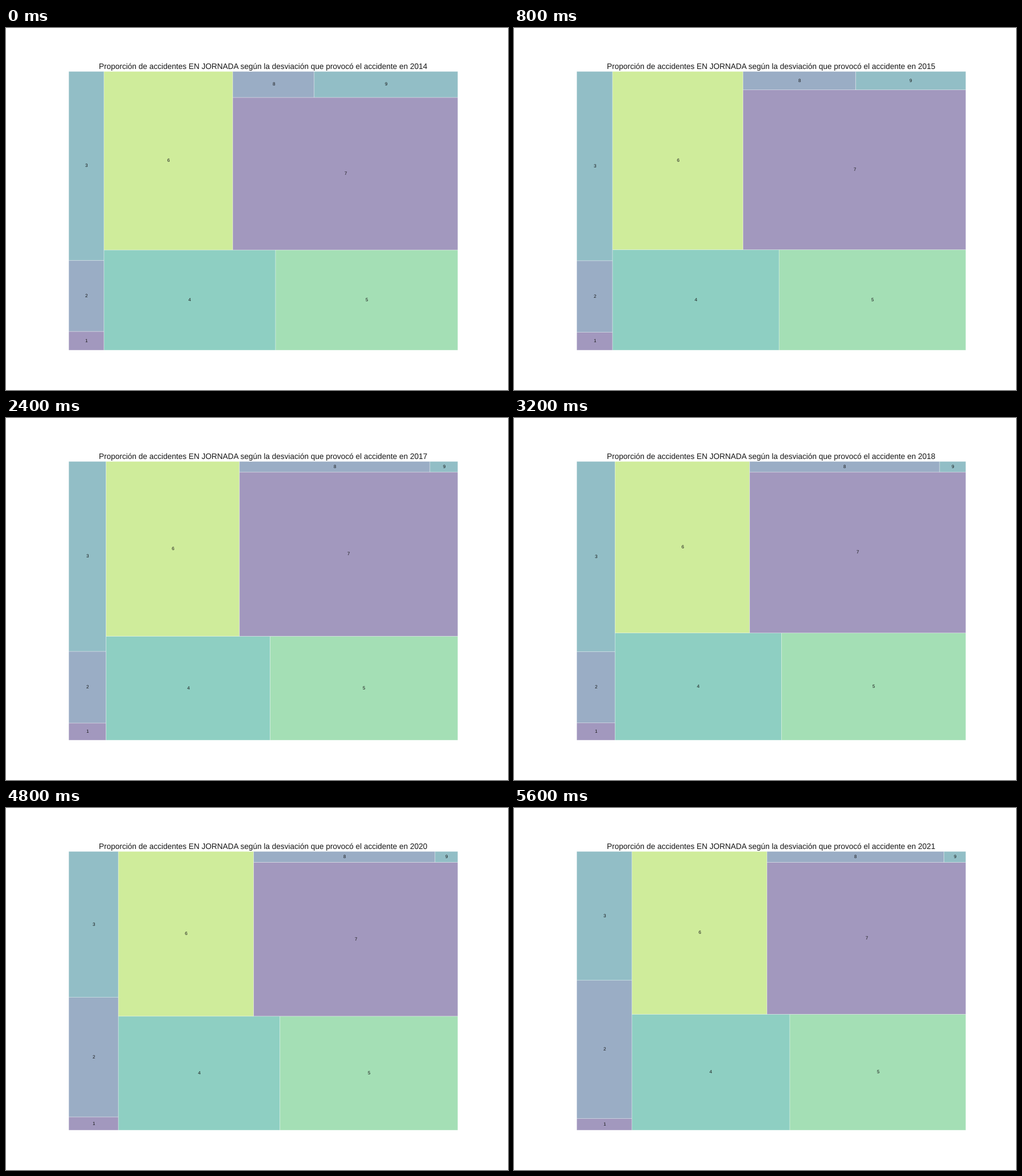
These frames come from a looping animation (881x636 px, 6400 ms). A matplotlib script:

```python
import matplotlib.pyplot as plt
import numpy as np
from matplotlib.animation import FuncAnimation
from matplotlib.patches import Rectangle

W, H, DPI = 881, 636, 64
SCALE = W / (18 * 72)        # the chart is laid out 18 inches wide
POINT = SCALE * 72 / DPI

plt.rcParams.update({
    "font.family": "Liberation Sans",
    "text.color": "0.08",
    "text.hinting": "none",
})

LEFT, RIGHT, BASE, TOP = W * 0.125, W * 0.9, H * 0.11, H * 0.88
PALETTE = ["#46327e", "#365c8d", "#277f8e", "#1fa187", "#4ac16d", "#a0da39"]
TITLE = ("Proporción de accidentes EN JORNADA según la desviación "
         "que provocó el accidente en {}")
FIRST_YEAR, LAST_YEAR = 2014, 2021

# Percentage of each group at four key years; the others are blended.
KEY_SHARES = np.array([
    [0.61, 2.31, 6.14, 15.85, 16.84, 21.20, 31.65, 1.95, 3.44],
    [0.57, 2.42, 6.36, 15.01, 17.76, 21.70, 34.02, 1.87, 0.29],
    [0.63, 2.56, 6.89, 17.18, 18.45, 21.09, 31.10, 1.86, 0.24],
    [0.59, 7.04, 6.56, 16.88, 18.82, 20.27, 27.84, 1.78, 0.22],
])


def shares(year):
    """Blend the key rows; most of the last change comes in 2020."""
    stage = np.interp(year, [2014, 2016, 2019, 2020, 2021],
                      [0, 1, 2, 2.65, 3])
    row = min(int(stage), len(KEY_SHARES) - 2)
    mix = stage - row
    return (1 - mix) * KEY_SHARES[row] + mix * KEY_SHARES[row + 1]


def split(box, weights, upward=False):
    """Cut (x, y, w, h) into parts, left to right or bottom to top."""
    x, y, w, h = box
    parts = []
    for f in np.array(weights) / np.sum(weights):
        if upward:
            parts.append((x, y, w, h * f))
            y += h * f
        else:
            parts.append((x, y, w * f, h))
            x += w * f
    return parts


def treemap(s):
    """Lay out the nine groups in order."""
    whole = (LEFT, BASE, RIGHT - LEFT, TOP - BASE)
    column, rest = split(whole, [sum(s[:3]), sum(s[3:])])
    low, high = split(rest, [sum(s[3:5]), sum(s[5:])], upward=True)
    six, block = split(high, [s[5], sum(s[6:])])
    seven, strip = split(block, [s[6], sum(s[7:])], upward=True)
    return [*split(column, s[:3], upward=True), *split(low, s[3:5]),
            six, seven, *split(strip, s[7:])]


fig = plt.figure(figsize=(W / DPI, H / DPI), dpi=DPI, facecolor="white")
ax = fig.add_axes([0, 0, 1, 1])
ax.set(xlim=(0, W), ylim=(0, H))
ax.axis("off")

title = ax.text((LEFT + RIGHT) / 2, TOP + 6 * SCALE, "",
                fontsize=20 * POINT, ha="center", va="baseline")
boxes, labels = [], []
for i in range(9):
    box = Rectangle((0, 0), 1, 1, facecolor=PALETTE[i % 6], edgecolor="white",
                    alpha=0.5, linewidth=POINT, snap=False)
    boxes.append(ax.add_patch(box))
    labels.append(ax.text(0, 0, str(i + 1), fontsize=12 * POINT,
                          ha="center", va="center"))


def update(frame):
    year = FIRST_YEAR + frame
    title.set_text(TITLE.format(year))
    for box, label, (x, y, w, h) in zip(boxes, labels, treemap(shares(year))):
        box.set_bounds(x, y, w, h)
        label.set_position((x + w / 2, y + h / 2))
    return [title, *boxes, *labels]


anim = FuncAnimation(fig, update, frames=LAST_YEAR - FIRST_YEAR + 1,
                     interval=800, repeat=True, repeat_delay=0)
plt.show()
```
